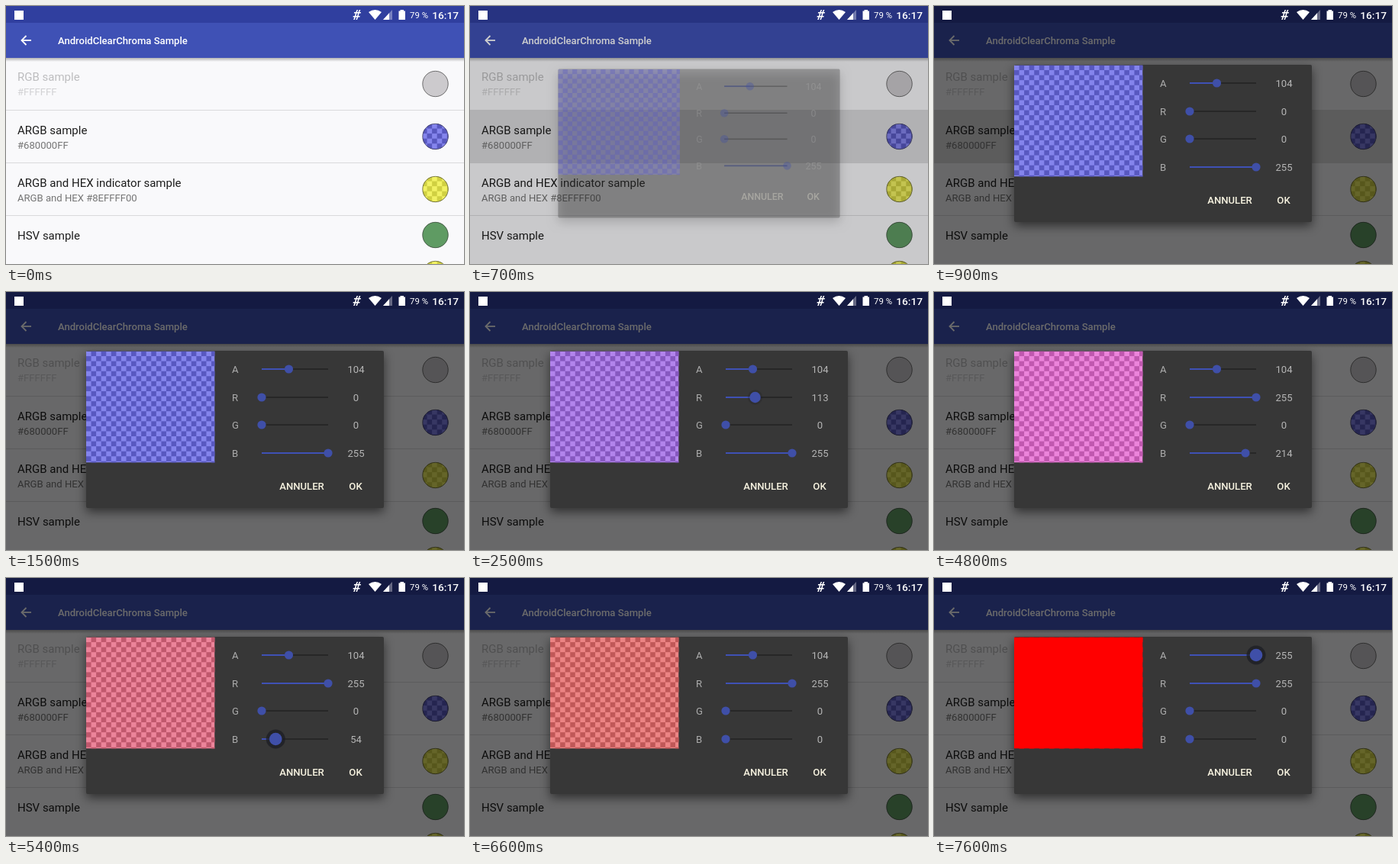
An HTML page with a canvas for the animation above (8 s loop, 600 px wide and 338 px high).

```html
<!DOCTYPE html>
<html lang="fr">
<head>
<meta charset="utf-8">
<title>Color picker demo</title>
<style>
  html, body { margin: 0; width: 100%; height: 100%; overflow: hidden; background: #fafafa; }
  canvas { display: block; width: 600px; height: 338px; }
</style>
</head>
<body>
<canvas></canvas>
<script>
const W = 600, H = 338, LOOP = 8000, STEP = 100;
const DIM = 0.58, CELL = 6.56;
const PRIMARY = '#3f51b5';
const canvas = document.querySelector('canvas');
const ctx = canvas.getContext('2d');
const ratio = window.devicePixelRatio || 1;
canvas.width = W * ratio;
canvas.height = H * ratio;

// Linear interpolation through [time, value] keys
function track(t, keys) {
  if (t <= keys[0][0]) return keys[0][1];
  for (let i = 1; i < keys.length; i++) {
    const [t0, v0] = keys[i - 1], [t1, v1] = keys[i];
    if (t <= t1) return v0 + (v1 - v0) * (t - t0) / (t1 - t0);
  }
  return keys[keys.length - 1][1];
}

const sliders = [
  { name: 'A', y: 101, value: [[6800, 104], [7600, 255]], press: [[6800, 0], [7200, 1]] },
  { name: 'R', y: 138, value: [[2100, 0], [2500, 113], [3000, 255]],
    press: [[2200, 0], [2700, 1], [3400, 1], [3900, 0]] },
  { name: 'G', y: 174, value: [[0, 0]], press: [[0, 0]] },
  { name: 'B', y: 211, value: [[4700, 255], [4800, 214], [5600, 0]],
    press: [[4800, 0], [5200, 1], [6000, 1], [6600, 0]] }
];

const rows = [
  { y: 98, title: 'RGB sample', note: '#FFFFFF', disabled: true, cy: 102, fill: '#cccacd' },
  { y: 167.5, title: 'ARGB sample', note: '#680000FF', cy: 171, argb: [104, 0, 0, 255] },
  { y: 236.5, title: 'ARGB and HEX indicator sample', note: 'ARGB and HEX #8EFFFF00',
    cy: 240, argb: [142, 255, 255, 0] },
  { y: 306, title: 'HSV sample', cy: 300, fill: '#5f9b63' },
  { cy: 351, argb: [142, 255, 255, 0] }
];

function rect(x, y, w, h, color) {
  ctx.fillStyle = color;
  ctx.fillRect(x, y, w, h);
}

function circle(x, y, r, color) {
  ctx.beginPath();
  ctx.arc(x, y, r, 0, Math.PI * 2);
  ctx.fillStyle = color;
  ctx.fill();
}

function line(color, width, ...points) {
  ctx.beginPath();
  points.forEach(([x, y]) => ctx.lineTo(x, y));
  ctx.strokeStyle = color;
  ctx.lineWidth = width;
  ctx.stroke();
}

function polygon(color, ...points) {
  ctx.beginPath();
  points.forEach(([x, y]) => ctx.lineTo(x, y));
  ctx.fillStyle = color;
  ctx.fill();
}

function text(str, x, y, size, color, weight = 400, align = 'left') {
  ctx.font = `${weight} ${size}px Roboto, sans-serif`;
  ctx.textAlign = align;
  ctx.fillStyle = color;
  ctx.fillText(str, x, y);
}

// Checkerboard seen through a translucent colour
function checkers(x, y, w, h, [a, ...rgb]) {
  const blend = base => `rgb(${rgb.map(c => Math.round(base + (c - base) * a / 255))})`;
  ctx.save();
  ctx.beginPath();
  ctx.rect(x, y, w, h);
  ctx.clip();
  rect(x, y, w, h, blend(223));
  const dark = blend(148);
  for (let j = 0; j * CELL < h; j++)
    for (let i = (j + 1) % 2; i * CELL < w; i += 2)
      rect(x + i * CELL, y + j * CELL, CELL, CELL, dark);
  ctx.restore();
}

function drawSwatch({ cy, fill, argb }) {
  ctx.save();
  ctx.beginPath();
  ctx.arc(562.5, cy, 17, 0, Math.PI * 2);
  ctx.clip();
  if (argb) checkers(545, cy - 17, 35, 35, argb);
  else rect(545, cy - 18, 36, 36, fill);
  ctx.restore();
  ctx.beginPath();
  ctx.arc(562.5, cy, 16.7, 0, Math.PI * 2);
  ctx.strokeStyle = 'rgba(60,60,60,.65)';
  ctx.lineWidth = 1;
  ctx.stroke();
}

function drawPage(t) {
  rect(0, 0, W, H, '#f9f9fb');
  const ripple = track(t, [[400, 0], [700, 1], [900, 1], [1200, 0]]);
  if (ripple > 0) rect(0, 137, W, 68, `rgba(0,0,0,${0.12 * ripple})`);

  const shade = ctx.createLinearGradient(0, 68, 0, 73);
  shade.addColorStop(0, 'rgba(0,0,0,.28)');
  shade.addColorStop(1, 'rgba(0,0,0,0)');
  rect(0, 68, W, 5, shade);
  rect(0, 0, W, 23, '#303f9f');
  rect(0, 22, W, 46, PRIMARY);

  line('#fff', 1.8, [33, 45], [21, 45]);
  line('#fff', 1.8, [26.5, 39], [20.5, 45], [26.5, 51]);
  text('AndroidClearChroma Sample', 68, 50, 13.1, '#fff', 500);

  for (const y of [136, 205, 274]) rect(0, y, W, 1, '#dadadc');
  for (const row of rows) {
    if (row.title) text(row.title, 15, row.y, 15, row.disabled ? '#bdbdbf' : '#1c1c1c');
    if (row.note) text(row.note, 15, row.y + 19, 13.1, row.disabled ? '#d2d2d4' : '#757575');
    drawSwatch(row);
  }
}

function drawStatusIcons() {
  rect(11, 6, 12, 12, '#fff');
  text('#', 459.5, 18, 18, '#fff', 'italic 700', 'center');

  ctx.beginPath();
  ctx.moveTo(483.5, 18);
  ctx.lineTo(475, 8);
  ctx.quadraticCurveTo(483.5, 2, 492, 8);
  ctx.fillStyle = '#fff';
  ctx.fill();

  polygon('rgba(255,255,255,.35)', [494, 18], [506, 18], [506, 5]);
  polygon('#fff', [494, 18], [502, 18], [502, 9.3]);

  rect(514.5, 6.5, 8.5, 11.5, '#fff');
  rect(516.5, 5, 4.5, 2, '#fff');
  text('79 %', 529, 16, 11.4, '#fff');
  text('16:17', 593, 17, 13.7, '#fff', 500, 'right');
}

function drawSlider({ name, y }, value, press) {
  const x0 = 335, length = 87, x = x0 + length * value / 255;
  text(name, 296, y + 5, 13.1, '#ababab');
  text(Math.round(value), 458.5, y + 5, 13.1, '#b5b5b5', 400, 'center');
  rect(x0, y - 0.8, length, 1.6, '#242424');
  rect(x0, y - 1, x - x0, 2, PRIMARY);
  if (press > 0) circle(x, y, 5.5 + 7 * press, `rgba(28,29,36,${0.75 * press * press})`);
  circle(x, y, 5.6 + 2.7 * press, '#3f4fa8');
}

function drawDialog(t, alpha) {
  const values = sliders.map(s => track(t, s.value));
  const scale = 0.92 + 0.08 * alpha;
  ctx.save();
  ctx.globalAlpha = alpha;
  ctx.translate(300, 180);
  ctx.scale(scale, scale);
  ctx.translate(-300, -180);

  ctx.save();
  ctx.shadowColor = 'rgba(0,0,0,.55)';
  ctx.shadowBlur = 14 * ratio;
  ctx.shadowOffsetY = 5 * ratio;
  ctx.beginPath();
  ctx.roundRect(105, 77, 390, 206, 2);
  ctx.fillStyle = '#373737';
  ctx.fill();
  ctx.restore();

  checkers(105, 77.5, 168.5, 146, values);
  sliders.forEach((s, i) => drawSlider(s, values[i], track(t, s.press)));
  text('ANNULER', 387.5, 258.5, 13.1, '#f7f3e0', 500, 'center');
  text('OK', 458, 258.5, 13.1, '#f7f3e0', 500, 'center');
  ctx.restore();
}

function draw(now) {
  const t = Math.floor(now % LOOP / STEP) * STEP;
  const open = track(t, [[600, 0], [900, 1]]);
  ctx.setTransform(ratio, 0, 0, ratio, 0, 0);
  drawPage(t);
  rect(0, 0, W, H, `rgba(0,0,0,${DIM * open})`);
  drawStatusIcons();
  if (open > 0) drawDialog(t, open);
}

const start = performance.now();
function tick() {
  draw(performance.now() - start);
  requestAnimationFrame(tick);
}
tick();
</script>
</body>
</html>
```
